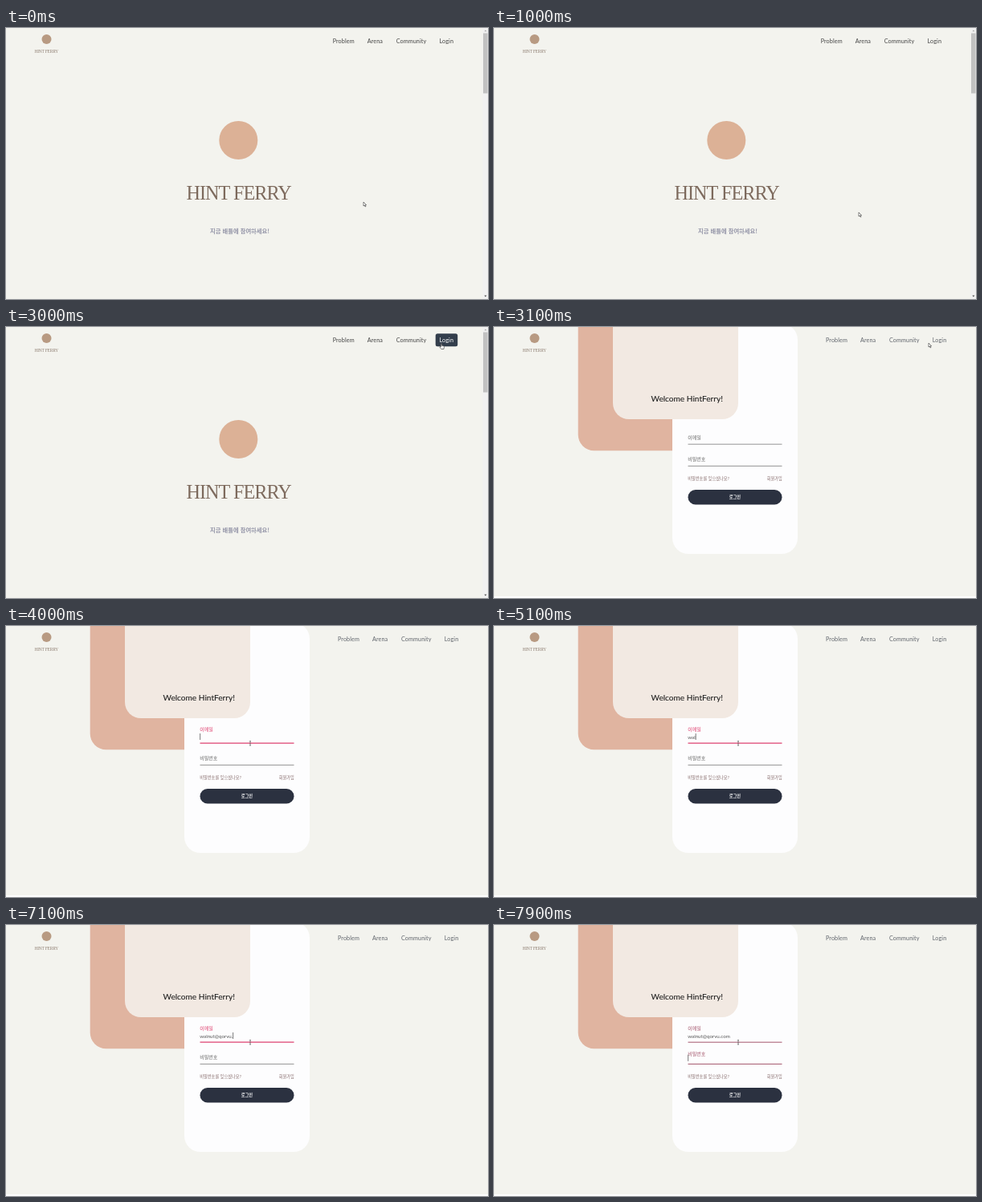
An HTML page that plays this animation: 600 by 338 pixels, repeating every 8000 ms.

```html
<!DOCTYPE html>
<html lang="ko">
<head>
<meta charset="utf-8">
<style>
html, body { margin: 0; width: 100%; height: 100%; overflow: hidden; background: #f3f3ee; }
svg { display: block; width: 100vw; height: 100vh; }
text { font-family: Lato, "Noto Sans CJK KR", "Noto Sans CJK", sans-serif; white-space: pre; }
.ko { font-family: "Noto Sans CJK KR", "Noto Sans CJK", sans-serif; }
.mark { font-family: "Liberation Serif", serif; letter-spacing: -.04em; text-anchor: middle; fill: #7d6a5d; }
.mid { text-anchor: middle; }
#nav { letter-spacing: .015em; }
</style>
</head>
<body>
<svg viewBox="0 0 600 338">
  <rect width="600" height="338" fill="#f3f3ee"/>
  <circle cx="50.5" cy="14" r="6" fill="#b89a82"/>
  <text class="mark" x="50.3" y="31" font-size="5.5" opacity=".85">HINT FERRY</text>

  <g id="home">
    <circle cx="289.3" cy="140" r="24" fill="#dcb196"/>
    <text class="mark" x="289.7" y="214" font-size="24.2">HINT FERRY</text>
    <text class="ko mid" x="291" y="255.7" font-size="7.3" font-weight="700" fill="#9495a8">지금 배틀에 참여하세요!</text>
    <rect id="pill" x="534.7" y="8.3" width="27.5" height="16" rx="2.5" fill="#333e4c"/>
    <rect x="593.5" width="6.5" height="338" fill="#f1f1f1"/>
    <rect x="594" y="6.5" width="5.5" height="75" fill="#c1c1c1"/>
    <path d="M595.4 4.2h3l-1.5-1.8z" fill="#a5a5a5"/>
    <path d="M595.4 333.6h3l-1.5 1.8z" fill="#505050"/>
  </g>

  <g id="login">
    <rect y="336" width="600" height="2" fill="#fff"/>
    <rect x="104.7" y="-40" width="157" height="194.3" rx="20" fill="#e0b4a0"/>
    <rect x="222" y="-4" width="156" height="287" rx="20" fill="#fdfdfe"/>
    <rect x="148" y="-40" width="156" height="155" rx="20" fill="#f2e9e2"/>
    <text class="mid" x="240.2" y="93" font-size="10.1" fill="#1c1c1c" stroke="#1c1c1c" stroke-width=".08">Welcome HintFerry!</text>
    <g id="fields"></g>
    <text id="mail" x="241.3" y="140.6" font-size="6.2" fill="#555"></text>
    <rect id="caret" width=".7" height="8" fill="#444"/>
    <text class="ko" x="241.3" y="191" font-size="5.2" fill="#856a6a">비밀번호를 잊으셨나요?</text>
    <text class="ko" x="339.8" y="191" font-size="5.2" fill="#856a6a">회원가입</text>
    <rect x="241.5" y="203" width="117" height="18.5" rx="9.25" fill="#2b3140"/>
    <text class="ko mid" x="300" y="213.9" font-size="5.2" font-weight="700" fill="#fff">로그인</text>
  </g>

  <g id="nav" font-size="7.2"></g>

  <g id="cursor" stroke="#333" stroke-width=".6" stroke-linejoin="round">
    <path id="arrow" fill="#fff" d="M0 0v5l1.2-1 .9 1.9.9-.4-.9-1.8h1.5z"/>
    <path id="hand" fill="#fff" d="M-.6.5q.6-.9 1.2 0v2.2l2.3.6q.6.2.5 1l-.4 2.7h-3.2l-2-2.6q.3-.9 1.6.1z"/>
    <path id="beam" fill="none" d="M-.9-2.7h1.8M0-2.7v5.4M-.9 2.7h1.8"/>
  </g>
</svg>
<script>
const LOOP = 8000, STEP = 100;
const OPEN = 3100, FOCUS = 3780, TYPE = 4700, KEY = 190, TAB = 7800;
const MAIL = 'walnut@qorvu.com';
// Pointer stops: time, x, y
const PATH = [[0, 445, 217], [400, 466, 222], [900, 464, 224], [1300, 400, 262], [1700, 305, 146],
  [1800, 306, 143], [2000, 306, 143], [2700, 536, 36], [2900, 542, 21], [3000, 542, 20.5],
  [3100, 541, 20], [3350, 541, 20], [3750, 304, 146.3], [LOOP, 304, 146.3]];

const $ = id => document.getElementById(id);
const clamp = v => Math.max(0, Math.min(1, v));
const ease = v => { v = clamp(v); return v * v * (3 - 2 * v); };
const mix = (a, b, k) => a + (b - a) * k;
const show = (el, on) => el.style.display = on ? '' : 'none';
const tint = k => `rgb(${[[105, 222], [105, 66], [105, 112]].map(([a, b]) => Math.round(mix(a, b, k)))})`;

function add(parent, tag, attrs, text = '') {
  const el = document.createElementNS('http://www.w3.org/2000/svg', tag);
  for (const k in attrs) el.setAttribute(k, attrs[k]);
  el.textContent = text;
  return parent.appendChild(el);
}

const links = [['Problem', 406.7], ['Arena', 449.7], ['Community', 485.7], ['Login', 539.5]]
  .map(([name, x]) => add($('nav'), 'text', { x, y: 18.9 }, name));

const fields = [['이메일', 146.2], ['비밀번호', 173.4]].map(([name, y]) => ({
  y,
  line: add($('fields'), 'path', { d: `M241.5 ${y}h117` }),
  label: add($('fields'), 'text', { class: 'ko', x: 241.3, 'font-size': 6 }, name)
}));

function drawField({ y, line, label }, lift, glow) {
  line.setAttribute('stroke', tint(glow));
  line.setAttribute('stroke-width', mix(.7, 1.3, glow));
  label.setAttribute('y', y - mix(6, 15.7, lift));
  label.setAttribute('fill', tint(glow));
}

function pointer(t) {
  const i = PATH.findIndex(p => p[0] > t);
  const [t0, x0, y0] = PATH[i - 1], [t1, x1, y1] = PATH[i];
  const k = ease((t - t0) / (t1 - t0));
  return [mix(x0, x1, k), mix(y0, y1, k)];
}

function draw(t) {
  const open = t >= OPEN, hover = !open && t >= 2800;
  const ink = open ? '#60656c' : '#444';
  show($('home'), !open);
  show($('login'), open);
  show($('pill'), hover);
  $('nav').setAttribute('transform', `translate(${open ? 6.3 : 0})`);
  $('nav').setAttribute('fill', ink);
  links[3].setAttribute('fill', hover ? '#fff' : ink);

  const focus = ease((t - FOCUS) / 200), next = ease((t - TAB) / 200);
  drawField(fields[0], focus, focus * (1 - next));
  drawField(fields[1], next, next);

  const typed = Math.max(0, Math.min(MAIL.length, Math.floor((t - TYPE) / KEY) + 1));
  $('mail').textContent = MAIL.slice(0, typed);
  const tabbed = t >= TAB;
  const last = tabbed ? TAB : typed ? TYPE + (typed - 1) * KEY : FOCUS;
  show($('caret'), t >= FOCUS && (t - last) % 1000 < 500);
  const width = typed && !tabbed ? $('mail').getComputedTextLength() : 0;
  $('caret').setAttribute('x', 241.4 + width);
  $('caret').setAttribute('y', tabbed ? 161.8 : 134);

  const beam = t >= 3700, hand = hover || t >= 1500 && t < 2200;
  $('cursor').setAttribute('transform', `translate(${pointer(t)})`);
  show($('beam'), beam);
  show($('hand'), hand);
  show($('arrow'), !beam && !hand);
}

const start = performance.now();
function tick() {
  const t = (performance.now() - start) % LOOP;
  draw(Math.floor(t / STEP) * STEP);
  requestAnimationFrame(tick);
}
tick();
</script>
</body>
</html>
```
